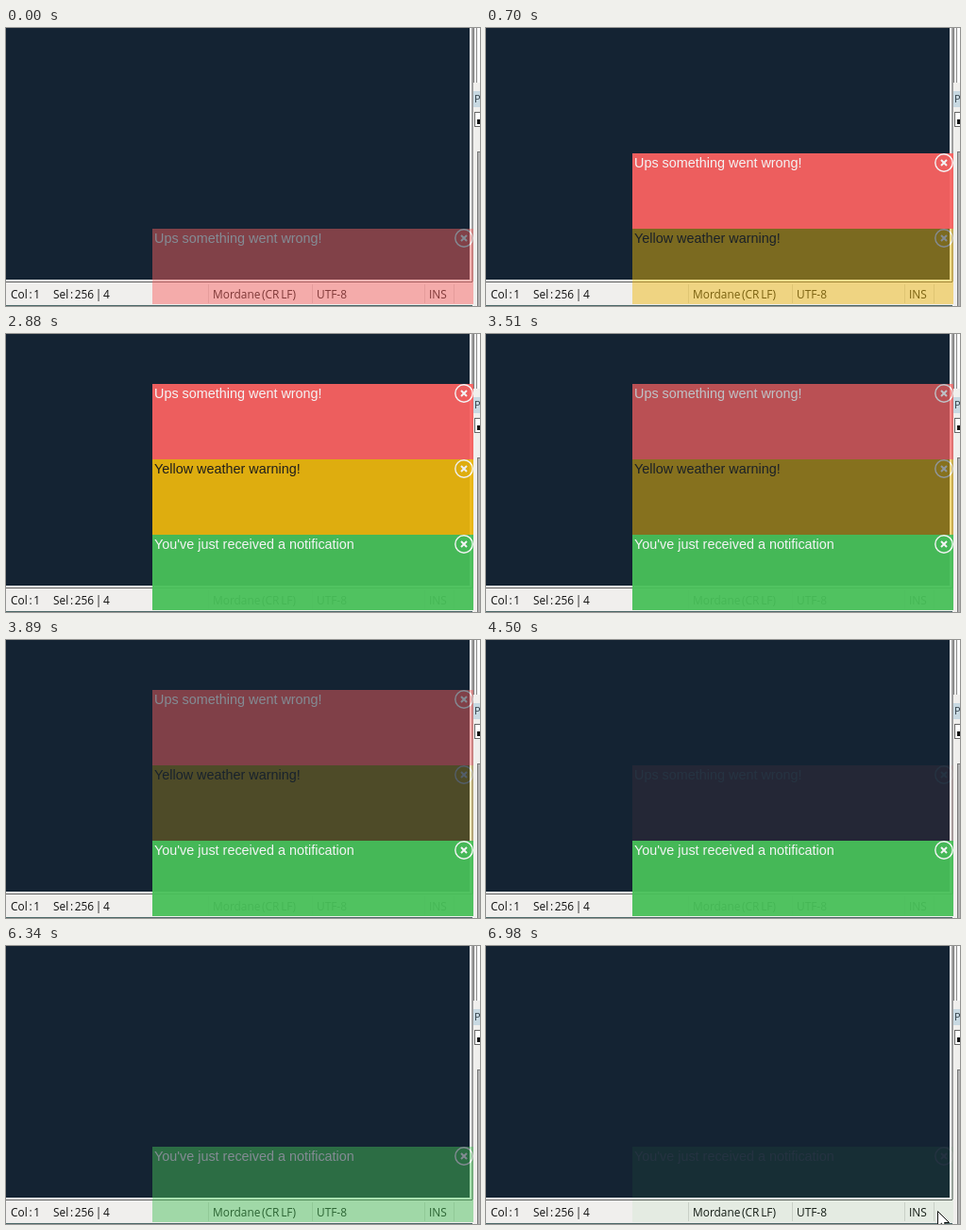
An HTML page with a canvas for the animation above (7.05 s loop, 502 by 295 pixels).

```html
<!DOCTYPE html>
<html lang="en">
<head>
<meta charset="utf-8">
<title>Stacked notifications</title>
<style>
  html, body { margin: 0; width: 100%; height: 100%; overflow: hidden; }
  #stage { position: relative; width: 502px; height: 295px; overflow: hidden; background: #f0efed; }
  canvas, .status span, .toast, .toast svg, #cursor { position: absolute; }
  canvas { left: 0; top: 0; }
  .status span { top: 273px; font: 11.9px/18px "Open Sans", sans-serif; word-spacing: -1.4px; color: #111; white-space: pre; }
  .toast { left: 155px; width: 340px; height: 80px; font: 14.4px/20px "Liberation Sans", Arial, sans-serif; color: #fff; }
  .toast span { position: absolute; left: 2px; top: 0; white-space: pre; }
  .toast svg { left: 320px; top: 0; fill: none; stroke: #fff; }
  #cursor { left: 478px; top: 281px; }
</style>
</head>
<body>
<div id="stage">
  <canvas width="502" height="295"></canvas>
  <div class="status">
    <span style="left:5px">Col : 1</span>
    <span style="left:50px">Sel : 256 | 4</span>
    <span style="left:219px">Mordane (CR LF)</span>
    <span style="left:329px">UTF-8</span>
    <span style="left:448px">INS</span>
  </div>
  <svg id="cursor" width="14" height="20">
    <path d="M.5 .5V17L4.5 13.2 7 19H10L7.5 12.5H12.5Z" fill="#fff" stroke="#111"/>
  </svg>
</div>
<script>
const LOOP = 7050, OPAQUE = 0.95, BOTTOM = 213, HEIGHT = 80;
const stage = document.getElementById('stage');
const cursor = document.getElementById('cursor');

// Moments at which the picture is refreshed.
const ticks = [0, 90, 160, 700, 780, 860, 1390, 1490, 1570, 1650, 2880, 3040,
  3190, 3270, 3350, 3420, 3500, 3580, 3740, 3890, 4050, 4200, 4350, 4500,
  5740, 5900, 6050, 6180, 6340, 6510, 6660, 6810, 6980];

const toasts = [
  { text: 'Ups something went wrong!', bg: 'rgb(249,98,97)', ink: '#fff', start: -150, rise: 300, leave: 3160, fall: 1450 },
  { text: 'Yellow weather warning!', bg: 'rgb(238,184,13)', ink: '#221f1a', start: 550, rise: 300, leave: 2850, fall: 1450 },
  { text: "You've just received a notification", bg: 'rgb(72,192,89)', ink: '#fff', start: 1370, rise: 280, leave: 5585, fall: 1500 }
];

function drawWindow() {
  const ctx = stage.querySelector('canvas').getContext('2d');
  const rect = (color, x, y, w, h) => {
    ctx.fillStyle = color;
    ctx.fillRect(x, y, w, h);
  };
  rect('#f0efed', 0, 0, 502, 295);
  rect('#142333', 0, 0, 491, 267);
  rect('#fff', 491, 0, 2, 269);
  rect('#fff', 0, 267, 493, 2);
  rect('#a0a0a0', 493, 0, 2, 269);
  rect('#5e5e5e', 0, 269, 494, 1);
  // Side panel
  rect('#777', 495, 0, 1, 58);
  rect('#fafafa', 496, 0, 6, 58);
  rect('#8c8c8c', 498, 0, 1, 58);
  rect('#c8d9e2', 495, 67, 7, 17);
  rect('#666', 496, 89, 6, 16);
  rect('#fff', 497, 90, 5, 14);
  rect('#111', 499, 97, 3, 5);
  rect('#777', 499, 131, 3, 164);
  rect('#b5b5b5', 500, 132, 2, 163);
  // Status bar
  for (const x of [214, 324, 443, 474]) rect('#d3d2d0', x, 272, 1, 20);
  rect('#4d6a6a', 0, 294, 494, 1);
  ctx.fillStyle = '#33414a';
  ctx.font = '11px "Open Sans", sans-serif';
  ctx.fillText('P', 496, 79);
}

function addToast(toast) {
  const el = document.createElement('div');
  el.className = 'toast';
  el.style.background = toast.bg;
  el.innerHTML = '<span></span><svg width="20" height="20"><circle cx="10" cy="10" r="9.2" stroke-width="1.4"/>' +
    '<path d="M7 7l6 6M13 7l-6 6" stroke-width="2"/></svg>';
  el.firstChild.textContent = toast.text;
  el.firstChild.style.color = toast.ink;
  stage.insertBefore(el, cursor);
  toast.el = el;
}

const clamp = v => Math.max(0, Math.min(1, v));

function opacity(toast, t) {
  const shown = clamp((t - toast.start) / toast.rise);
  const gone = clamp((t - toast.leave) / toast.fall);
  return OPAQUE * shown * (1 - gone);
}

function render(now) {
  const time = now % LOOP;
  const t = ticks.filter(tick => tick <= time).pop();
  // Each live toast pushes the older ones up by one place.
  let top = BOTTOM;
  for (const toast of [...toasts].reverse()) {
    const alpha = opacity(toast, t);
    toast.el.style.opacity = alpha;
    toast.el.style.top = top + 'px';
    if (alpha > 0) top -= HEIGHT;
  }
  cursor.style.visibility = t >= 6980 ? 'visible' : 'hidden';
}

drawWindow();
toasts.forEach(addToast);
const began = performance.now();
function loop() {
  render(performance.now() - began);
  requestAnimationFrame(loop);
}
loop();
</script>
</body>
</html>
```
